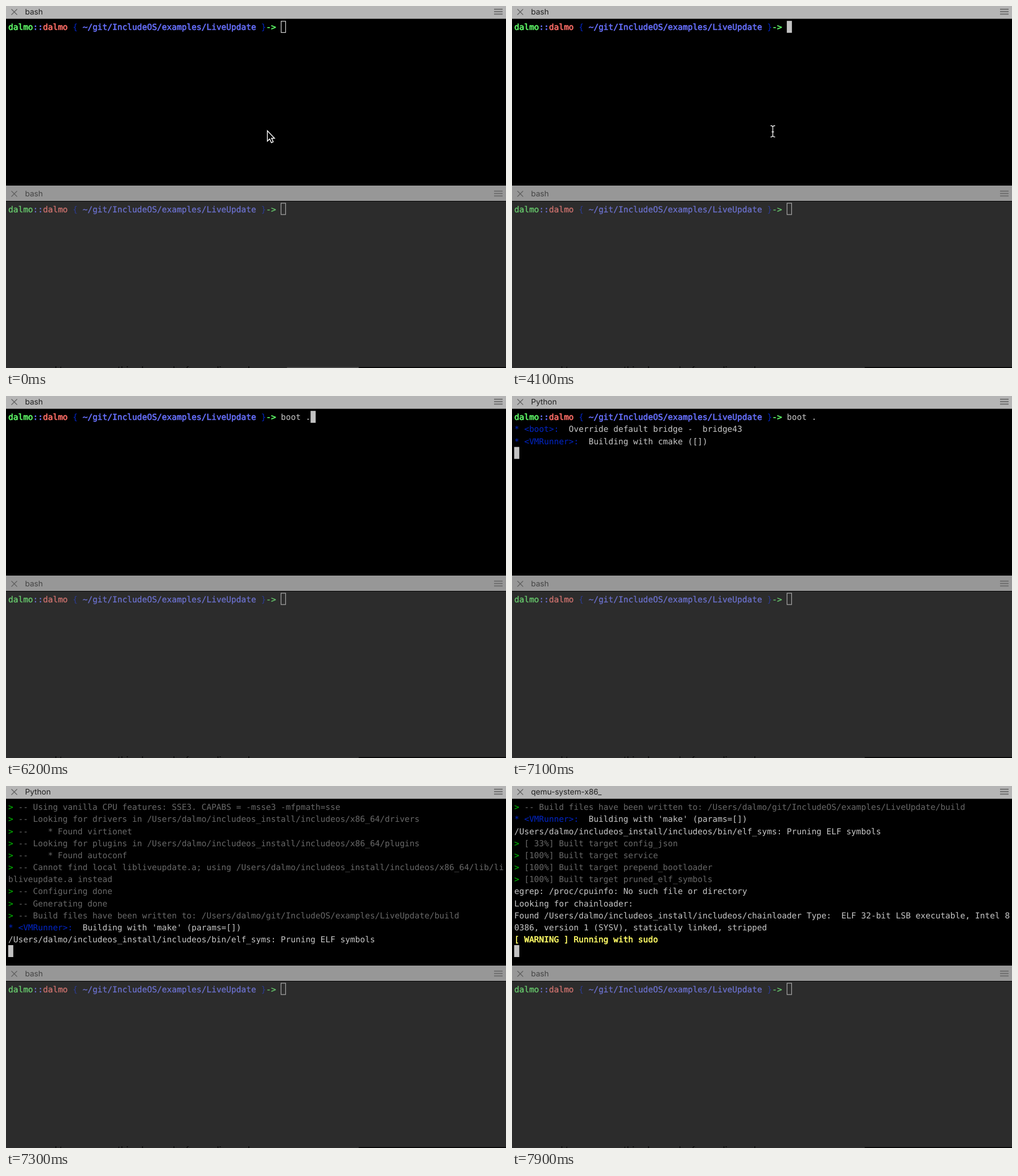
Animation, 879 px wide and 637 px high, one loop 8000 ms. Source, as an HTML page:

```html
<!DOCTYPE html>
<html lang="en">
<head>
<meta charset="utf-8">
<title>Terminal</title>
<style>
  html, body { margin: 0; width: 100%; height: 100%; overflow: hidden; background: #000; }
  svg { display: block; width: 879px; height: 637px; }
  text { white-space: pre; text-rendering: geometricPrecision; }
  .mono { font: 14.48px "DejaVu Sans Mono", "Noto Sans Mono", monospace; }
  .title { font: 13.6px Inter, Roboto, sans-serif; }
</style>
</head>
<body>
<svg viewBox="0 0 879 637">
  <defs>
    <clipPath id="edge"><rect y="634" width="620" height="3"/></clipPath>
    <g id="controls" fill="none">
      <path d="M9.5 5.5l10 10m0-10l-10 10" stroke="#5c5c5c" stroke-width="1.1"/>
      <path d="M858 5.8h15m-15 4.2h15m-15 4.2h15" stroke="#707070" stroke-width="2"/>
    </g>
  </defs>

  <rect width="879" height="22.5" fill="#b5b5b5"/>
  <use href="#controls"/>
  <text id="title" class="title" x="33.5" y="14.7" fill="#202020"></text>
  <g id="top" class="mono"></g>
  <rect id="cursor" height="21"/>

  <rect y="316" width="879" height="27" fill="#979797"/>
  <use href="#controls" y="320"/>
  <text class="title" x="33.5" y="334.8" fill="#434343">bash</text>
  <rect y="344" width="879" height="293" fill="#2c2c2c"/>
  <g id="bottom" class="mono"></g>
  <rect x="483.5" y="347" width="8" height="20" fill="none" stroke="#a8a8a8" stroke-width="1.2"/>
  <rect x="620" y="635.5" width="259" height="1.5" fill="#000"/>
  <text x="0" y="646" clip-path="url(#edge)" fill="#080808"
    style="font:17px Lato,sans-serif">ay you need to open something by regular forwarding and more</text>
  <rect id="glint" x="494" y="635.6" width="126" height="1.4" fill="#555"/>

  <path id="arrow" d="M459.5 219.5v18.3l4.1-3.8 2.9 6.5 3.3-1.5-2.9-6.2h5.2z"
    fill="#000" stroke="#fff" stroke-width="1.4"/>
  <path id="beam" d="M454.5 210.5q4 0 4 3v14q0 3-4 3m8-20q-4 0-4 3m0 14q0 3 4 3m-6-9h4"
    fill="none" stroke="#f2f2f2" stroke-width="1.3"/>
</svg>
<script>
const LOOP = 8000, CELL = 8.715, LEFT = 4, PITCH = 21.15, ROWS = 12;
const NS = 'http://www.w3.org/2000/svg';
const $ = id => document.getElementById(id);

const bright = { fg: '#c7c7c7', green: '#5ffa68', blue: '#6871ff', red: '#ff6e67', navy: '#0225c7',
  leaf: '#00c200', gray: '#686868', yellow: '#fffc67' };
const dim = { green: '#67c96c', blue: '#6b70cc', red: '#c9706c', navy: '#2c3c92' };

// Each row is a list of runs: [text, colour name, bold].
const user = 'dalmo', home = '/Users/' + user;
const kit = home + '/includeos_install/includeos';
const prompt = [
  [user, 'green', 1], ['::', 'blue', 1], [user, 'red', 1], [' { ', 'navy'],
  ['~/git/IncludeOS/examples/LiveUpdate', 'blue', 1], [' }', 'navy'], ['-> ', 'green', 1]
];
const plain = s => [[s, 'fg']];
const quoted = s => [['> ', 'leaf'], [s, 'gray']];
const note = (tag, s) => [[`* <${tag}>:`, 'navy'], ['  ' + s, 'fg']];

const log = [
  [...prompt, ['boot .', 'fg']],
  note('boot', 'Override default bridge -  bridge43'),
  note('VMRunner', 'Building with cmake ([])'),
  quoted('-- Using vanilla CPU features: SSE3. CAPABS = -msse3 -mfpmath=sse'),
  quoted(`-- Looking for drivers in ${kit}/x86_64/drivers`),
  quoted('--    * Found virtionet'),
  quoted(`-- Looking for plugins in ${kit}/x86_64/plugins`),
  quoted('--    * Found autoconf'),
  quoted(`-- Cannot find local libliveupdate.a; using ${kit}/x86_64/lib/li`),
  [['bliveupdate.a instead', 'gray']],
  quoted('-- Configuring done'),
  quoted('-- Generating done'),
  quoted(`-- Build files have been written to: ${home}/git/IncludeOS/examples/LiveUpdate/build`),
  note('VMRunner', "Building with 'make' (params=[])"),
  plain(`${kit}/bin/elf_syms: Pruning ELF symbols`),
  quoted('[ 33%] Built target config_json'),
  quoted('[100%] Built target service'),
  quoted('[100%] Built target prepend_bootloader'),
  quoted('[100%] Built target pruned_elf_symbols'),
  plain('egrep: /proc/cpuinfo: No such file or directory'),
  plain('Looking for chainloader:'),
  plain(`Found ${kit}/chainloader Type:  ELF 32-bit LSB executable, Intel 8`),
  plain('0386, version 1 (SYSV), statically linked, stripped'),
  [['[ WARNING ] Running with sudo', 'yellow', 1]]
];

const keyTimes = [4200, 4300, 4400, 4600, 4700, 5100];
// [time, rows printed so far]
const output = [[6900, 1], [7100, 3], [7200, 12], [7300, 15], [7400, 16], [7500, 17],
  [7600, 19], [7700, 20], [7800, 23], [7900, 24]];

// Bold runs are the regular face thickened by a stroke of the given weight.
function drawRows(group, rows, colors, baseline, weight) {
  group.replaceChildren(...rows.map((runs, i) => {
    const line = document.createElementNS(NS, 'text');
    line.setAttribute('y', baseline + i * PITCH);
    let col = 0;
    for (const [str, color, bold] of runs) {
      const span = document.createElementNS(NS, 'tspan');
      span.setAttribute('x', LEFT + col * CELL);
      span.setAttribute('fill', colors[color]);
      if (bold) {
        span.setAttribute('stroke', colors[color]);
        span.setAttribute('stroke-width', weight);
      }
      span.textContent = str;
      line.append(span);
      col += str.length;
    }
    return line;
  }));
}

function setCursor(col, row, filled) {
  const inset = filled ? 0 : 0.6;
  const attrs = {
    x: LEFT - 0.2 + col * CELL + inset, y: 26.2 + row * PITCH + inset,
    width: 9 - 2 * inset, height: 21 - 2 * inset,
    fill: filled ? '#c2c2c2' : 'none', stroke: filled ? 'none' : '#d8d8d8', 'stroke-width': 1.2
  };
  for (const k in attrs) $('cursor').setAttribute(k, attrs[k]);
}

const show = (id, on) => $(id).setAttribute('visibility', on ? 'visible' : 'hidden');

let last = '';
function render(t) {
  const typed = keyTimes.filter(k => t >= k).length;
  const printed = output.reduce((n, [at, count]) => t >= at ? count : n, 0);
  const focused = t >= 800;
  const pointing = t < 100;
  const title = t < 7100 ? 'bash' : t < 7800 ? 'Python' : 'qemu-system-x86_';
  const state = [typed, printed, focused, pointing, title].join();
  if (state === last) return;
  last = state;

  const rows = printed
    ? log.slice(0, printed).slice(-ROWS)
    : [[...prompt, ['boot .'.slice(0, typed), 'fg']]];
  drawRows($('top'), rows, bright, 42.3, 0.6);
  if (printed) setCursor(0, rows.length, true);
  else setCursor(55 + typed, 0, focused);

  $('title').textContent = title;
  show('arrow', pointing);
  show('beam', !pointing && !typed); // the pointer hides while typing
  show('glint', !focused);
}

drawRows($('bottom'), [prompt], dim, 362.5, 0.3);
const start = performance.now();
function tick() {
  render((performance.now() - start) % LOOP);
  requestAnimationFrame(tick);
}
tick();
</script>
</body>
</html>
```
